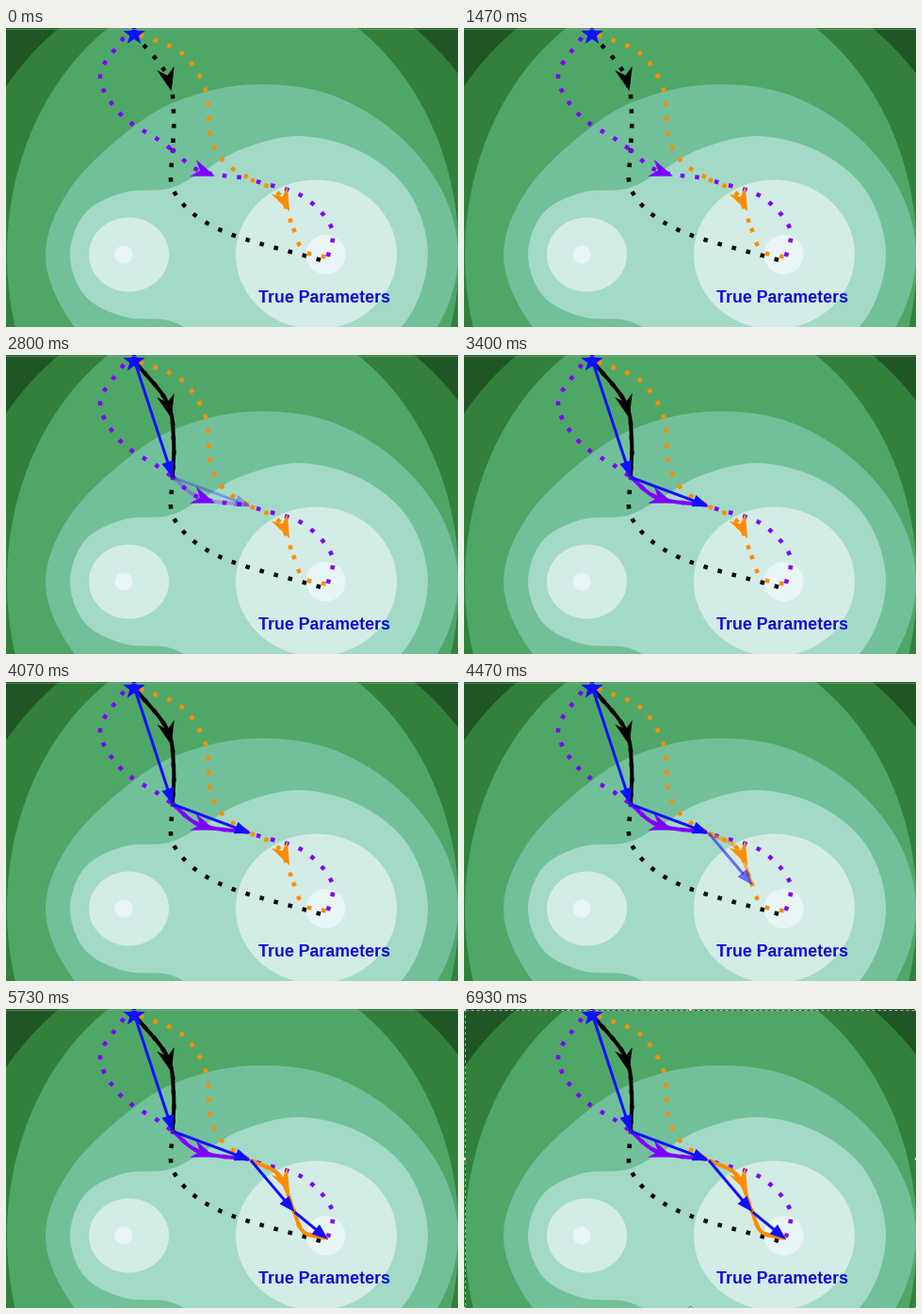
These frames come from a looping animation (480x318 px, 6990 ms). A matplotlib script:

```python
import numpy as np
import matplotlib.pyplot as plt
from matplotlib.animation import FuncAnimation
from matplotlib.patches import Ellipse, Polygon, Rectangle

W, H, DPI = 480, 318, 100
PT = 72 / DPI
LOOP, STEP, TICKS = 6990, 30, 105
MID = 241  # the landscape is symmetric about this height
BLUE, PURPLE, ORANGE, BLACK = "#1010fa", "#8000ff", "#ff8c00", "#000000"
GREENS = ["#1e5725", "#32803a", "#4fa767", "#72c09a", "#a3dac7", "#d4ece6", "#e9f5f5"]

fig = plt.figure(figsize=(W / DPI, H / DPI), dpi=DPI, facecolor=GREENS[0])
ax = fig.add_axes([0, 0, 1, 1])
ax.set(xlim=(0, W), ylim=(H, 0))
ax.axis("off")


def spline(pts, n=24):
    """Open Catmull-Rom curve through the points."""
    p = np.array(pts, float)
    p = np.vstack([2 * p[0] - p[1], p, 2 * p[-1] - p[-2]])
    t = np.linspace(0, 1, n, endpoint=False)[:, None]
    out = [0.5 * (2 * b + (c - a) * t + (2 * a - 5 * b + 4 * c - d) * t**2
                  + (3 * b - a - 3 * c + d) * t**3)
           for a, b, c, d in zip(p, p[1:], p[2:], p[3:])]
    return np.vstack(out + [p[-2:-1]])


def oval(x, rx, ry, level):
    ax.add_patch(Ellipse((x, MID), 2 * rx, 2 * ry, color=GREENS[level], lw=0))


def valley(top, level):
    """Region around both wells: its upper edge, mirrored downwards."""
    first, last = top[0], top[-1]
    below = lambda p: (p[0], 2 * MID - p[1])
    edge = spline([below(top[1]), *top, below(top[-2])])[24:-24]
    mirror = np.c_[edge[:, 0], 2 * MID - edge[:, 1]][::-1]
    ax.add_patch(Polygon(np.vstack([edge, mirror]), color=GREENS[level], lw=0))


def dotted(pts, color, size=4.5, period=15.6):
    ax.plot(*spline(pts).T, color=color, lw=size * PT, zorder=3,
            ls=(0, (1, period / size - 1)), dash_capstyle="butt")


def solid(pts, color, width, z):
    return ax.plot(*np.array(pts).T, color=color, lw=width * PT, zorder=z,
                   solid_capstyle="butt")


def head(tip, back, length, half, notch, color, z):
    """Arrowhead pointing from back to tip."""
    tip, back = np.array(tip, float), np.array(back, float)
    u = (tip - back) / np.hypot(*(tip - back))
    v = half * np.array([-u[1], u[0]])
    base = tip - length * u
    pts = [tip, base + v, tip - notch * u, base - v]
    return ax.add_patch(Polygon(pts, fc=color, lw=0, zorder=z))


def arrow(start, tip):
    a, b = np.array(start, float), np.array(tip, float)
    end = b - 15 * (b - a) / np.hypot(*(b - a))
    return solid([a, end], BLUE, 3, 6) + [head(b, a, 17, 6.6, 17, BLUE, 6)]


# Loss landscape
oval(245, 300, 310, 1)
oval(241, 240, 289, 2)
valley([(42, MID), (70, 168), (138, 103), (195, 73), (265, 60),
        (342, 70), (412, 110), (462, 171), (480, MID)], 3)
valley([(68, MID), (84, 197), (125, 175), (172, 171), (205, 155), (250, 129),
        (312, 115), (378, 132), (428, 175), (448, MID)], 4)
oval(130.5, 42.5, 39.5, 5)
oval(329.5, 85.5, 79.5, 5)
oval(125, 9.5, 9.5, 6)
oval(339.5, 21, 21, 6)

# One path piece per optimisation step, then the pieces never taken
steps = [
    (BLACK, [(136, 6), (171, 50), (178, 90), (177, 130)]),
    (PURPLE, [(176, 129), (206, 152), (258, 160)]),
    (ORANGE, [(260, 161), (290, 177), (306, 216)]),
    (ORANGE, [(305, 213), (316, 237), (342, 244)]),
]
unused = [
    (PURPLE, [(125, 10), (100, 51), (122, 92), (162, 119), (177, 130)]),
    (PURPLE, [(266, 163), (315, 179), (346, 213), (341, 247)]),
    (ORANGE, [(142, 7), (187, 27), (212, 66), (217, 114), (231, 142), (260, 161)]),
    (BLACK, [(177, 128), (179, 175), (228, 215), (338, 248)]),
]
for color, pts in unused + steps:
    dotted(pts, color)
head((175.5, 67), (169.5, 42.5), 25, 9.5, 17, BLACK, 5)
head((222, 157.5), (199, 149), 25, 9.5, 17, PURPLE, 5)
head((301, 195), (291, 174), 25, 9.5, 17, ORANGE, 5)

# Start marker and label
k = np.arange(10)
r = np.where(k % 2, 5, 12.3)
ang = k * np.pi / 5
ax.add_patch(Polygon(np.c_[136 + r * np.sin(ang), 6.8 - r * np.cos(ang)],
                     fc=BLUE, lw=0, zorder=7))
ax.text(267.7, 291.7, "True Parameters", color="#0c0ce0", family="Liberation Sans",
        weight="bold", size=17.8 * PT, va="baseline", zorder=7)

# Each step fades in over its own span of ticks
joints = [(137, 8), (177, 130), (260, 161), (306.5, 216), (342, 245)]
spans = [(27, 34), (38, 49), (61, 72), (72, 83)]
fades = [(span, solid(spline(pts), color, 4, 4) + arrow(a, b))
         for span, (color, pts), a, b in zip(spans, steps, joints, joints[1:])]

# Thin top edge, and a selection frame that flashes at the end
ax.plot([0, W], [0.5, 0.5], color="#8f9a90", lw=PT, alpha=0.6, zorder=8)
frame = [
    ax.add_patch(Rectangle((0.5, 0.5), W - 1, H - 1, fill=False, ec=c,
                           lw=PT, ls=ls, zorder=9, alpha=0.75))
    for c, ls in [("#333333", "-"), ("#d8d8d8", (0, (3, 3)))]
]
frame += ax.plot([0, W / 2, W, 0, W, 0, W / 2, W],
                 [0, 0, 0, H / 2, H / 2, H, H, H], "o", ms=4 * PT,
                 mfc="#e8e8e8", mec="#555555", mew=0.5, zorder=10)


def update(i):
    tick = int((i + 0.5) * STEP * TICKS / LOOP)
    for (t0, t1), parts in fades:
        s = np.clip((tick - t0) / (t1 - t0), 0, 1)
        for part in parts:
            part.set_alpha(s * s * (3 - 2 * s))
            part.set_visible(s > 0)
    for part in frame:
        part.set_visible(tick == TICKS - 1)
    return []


anim = FuncAnimation(fig, update, frames=LOOP // STEP, interval=STEP,
                     repeat=True, repeat_delay=0, blit=False)
plt.show()
```
